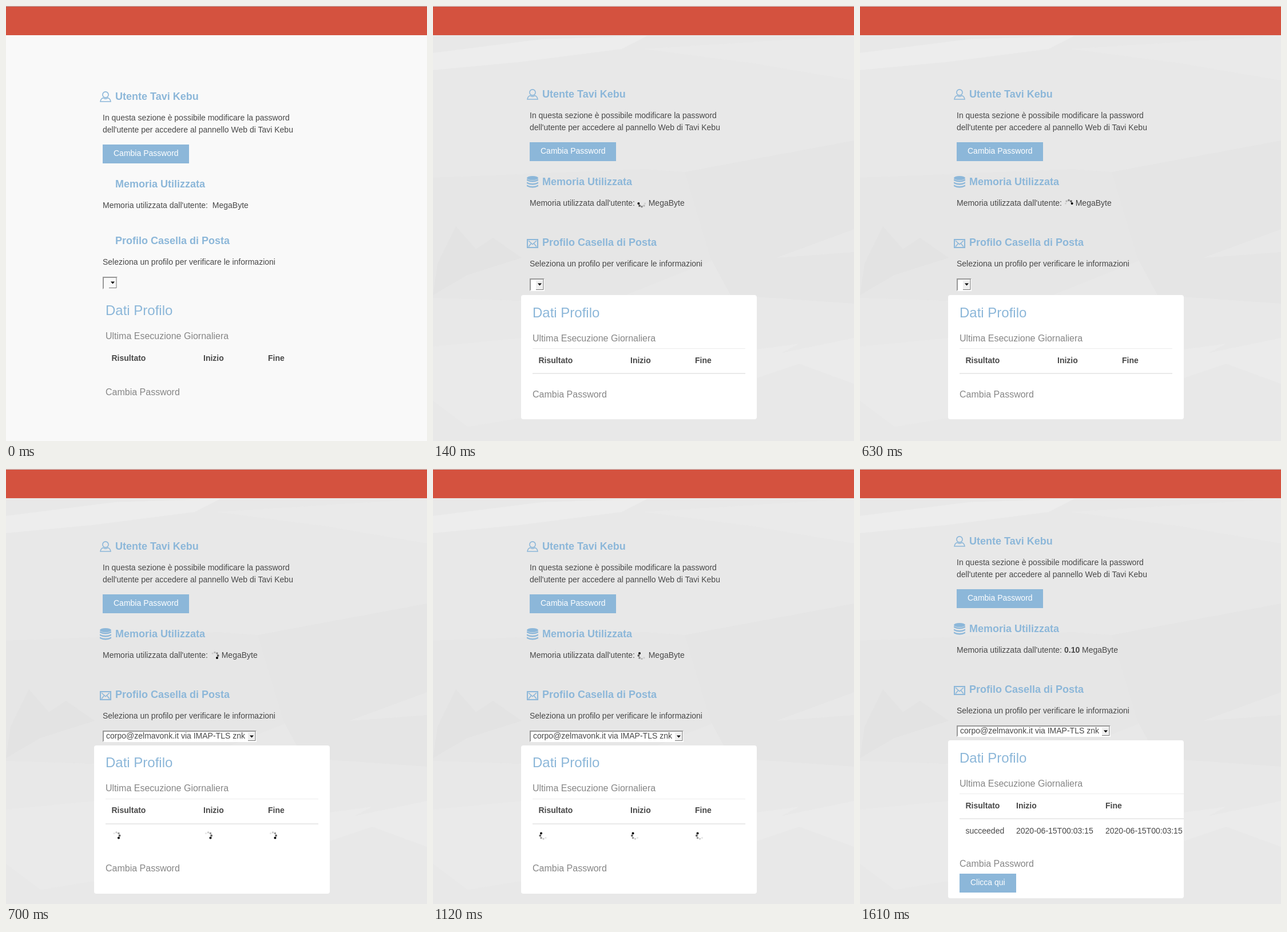
An HTML page for the animation above (1820 ms loop, 736x760 px).

```html
<!DOCTYPE html>
<html lang="it">
<head>
<meta charset="utf-8">
<style>
  html, body { margin: 0; width: 100%; height: 100%; overflow: hidden; background: #f9f9f9; }
  svg { display: block; font-family: "Liberation Sans", Arial, sans-serif; }
</style>
</head>
<body>
<svg id="stage" width="736" height="760" viewBox="0 0 736 760"></svg>
<script>
const LOOP = 1820, TICK = 70;
const BLUE = '#8cb7d9', TEXT = '#484848', GREY = '#868686';
const stage = document.getElementById('stage');

// Layout phases: vertical centres of each block
const phases = [
  { at: 0, top: 158, profile: 410, select: 473, title: 532, sub: 577, head: 615, change: 675 },
  { at: 140, top: 154, profile: 413, select: 476, panel: [505, 722], title: 536, sub: 581, lines: [598, 641], head: 619, change: 679 },
  { at: 700, top: 135, profile: 394, select: 457, panel: [483, 742], title: 513, sub: 558, lines: [576, 619], head: 596, row: 640, change: 698, filled: true },
  { at: 1190, top: 126, profile: 385, select: 448, panel: [474, 750], title: 505, sub: 550, lines: [567, 610], head: 588, row: 632, change: 690, filled: true, memory: true },
];

const rect = (x, y, w, h, fill, more = '') =>
  `<rect x="${x}" y="${y}" width="${w}" height="${h}" fill="${fill}" ${more}/>`;
const path = (d, fill, more = '') => `<path d="${d}" fill="${fill}" ${more}/>`;
const text = (x, mid, str, size = 14, fill = TEXT, weight = 400) =>
  `<text x="${x}" y="${mid + Math.round(size * .34)}" font-size="${size}" fill="${fill}" font-weight="${weight}" xml:space="preserve">${str}</text>`;
const heading = (mid, str) => text(191, mid, str, 18, BLUE, 700);
const button = (x, y, w, str) => rect(x, y, w, 33, BLUE) + text(x + 19, y + 15, str, 14, '#fff');
const at = (x, y, body) => `<g transform="translate(${x} ${y})">${body}</g>`;

const line = `stroke="${BLUE}" stroke-width="1.6"`;
const userIcon = `<circle cx="10" cy="6" r="5.1" fill="none" ${line}/>`
  + path('M6 11.5Q1.5 13 1 18H19Q18.5 13 14 11.5Q10 15 6 11.5', 'none', line);
const diskIcon = `<ellipse cx="10" cy="3.6" rx="10" ry="3.6" fill="${BLUE}"/>`
  + [5.5, 10.5, 15.5].map(y => path(`M0 ${y}Q10 ${y + 5} 20 ${y}V${y + 2.5}Q10 ${y + 7.5} 0 ${y + 2.5}Z`, BLUE)).join('');
const mailIcon = rect(1, 1, 18, 14, 'none', `stroke="${BLUE}" stroke-width="2"`)
  + path('M3 3L10 9.5L17 3M3 13.5L7.5 8M17 13.5L12.5 8', 'none', line);

const backdrop = rect(0, 51, 736, 709, '#e8e8e8')
  + path('M0 82L190 58L375 52L330 75L150 98L0 112Z', '#ededed')
  + path('M370 75L736 52V130L560 100Z', '#eaeaea')
  + path('M0 300L370 285L440 290L500 440L300 520L0 510Z', '#e6e6e6')
  + path('M8 450L40 385L75 425L105 405L155 440L60 470L0 505Z', '#e3e3e3')
  + path('M440 290L736 235V390L600 440L736 430V520L520 505L485 440Z', '#e5e5e5')
  + path('M0 595L154 580V720L60 735L0 690Z', '#eaeaea')
  + path('M566 600L640 590L610 606L736 580V660L640 625L566 650Z', '#ebebeb');

function spinner(x, y, step) {
  return [1, .62, .42, .22, .1].map((alpha, i) => {
    const a = (step - i) * Math.PI / 4;
    return `<circle cx="${x + 5.6 * Math.cos(a)}" cy="${y + 5.6 * Math.sin(a)}" r="${2 - i * .1}" opacity="${alpha}"/>`;
  }).join('');
}

function selectBox(y, filled, loaded) {
  const w = filled ? 269 : 26, h = filled ? 20 : 22, bx = 169 + w - 15;
  return rect(169, y, w, h, loaded ? '#fff' : '#f9f9f9')
    + path(`M169 ${y}h${w}l-2 2h${4 - w}v${h - 4}l-2 2Z`, '#989898')
    + rect(bx, y + 3, 13, h - 5, loaded ? '#efefef' : '#f9f9f9')
    + path(`M${bx} ${y + h - 2.5}h13v${4 - h}`, 'none', 'stroke="#777"')
    + path(`M${bx + 3} ${y + 8.5}h7l-3.5 4Z`, '#000')
    + (filled ? text(175, y + 9, 'corpo@zelmavonk.it via IMAP-TLS znk') : '');
}

function table(p, step, done) {
  const cols = done ? [184.5, 273, 429] : [184.5, 345, 458];
  const values = ['succeeded', '2020-06-15T00:03:15', '2020-06-15T00:03:15'];
  const rules = p.lines
    ? p.lines.map((y, i) => rect(174, y, done ? 392 : 372, 1 + i, i ? '#eaeaea' : '#ececec')).join('') : '';
  return rules + cols.map((x, i) =>
    text(x, p.head, ['Risultato', 'Inizio', 'Fine'][i], 14, TEXT, 700)
    + (!p.row ? '' : done ? text(x, p.row, values[i]) : spinner(x + 8.5, p.row + .5, step))).join('');
}

function render(time) {
  const p = phases.filter(s => s.at <= time).pop();
  const loaded = time >= 140, done = time >= 1610;
  const step = Math.floor((time + 265) / 100);
  const y = p.top, memory = y + 190;
  let out = loaded ? backdrop : rect(0, 51, 736, 709, '#f9f9f9');
  out += rect(0, 0, 736, 51, '#d4523f') + rect(0, 0, 736, 1, loaded ? '#c8d6da' : '#b8b0ae');

  out += at(164, y - 9, userIcon) + heading(y, 'Utente Tavi Kebu')
    + text(169, y + 37, 'In questa sezione è possibile modificare la password')
    + text(169, y + 58, "dell'utente per accedere al pannello Web di Tavi Kebu")
    + button(169, y + 84, 151, 'Cambia Password');

  out += heading(y + 153, 'Memoria Utilizzata') + text(169, memory, "Memoria utilizzata dall'utente:")
    + text(p.memory ? 388 : loaded ? 376.7 : 360.8, memory, 'MegaByte');
  if (p.memory) out += text(357, memory, '0.10', 14, TEXT, 700);
  else if (loaded) out += spinner(365, memory + 1, step);

  out += heading(p.profile, 'Profilo Casella di Posta')
    + text(169, p.profile + 37, 'Seleziona un profilo per verificare le informazioni')
    + selectBox(p.select, p.filled, loaded);
  if (loaded) out += at(164, y + 143, diskIcon) + at(164, p.profile - 6, mailIcon);

  if (p.panel) out += rect(154, p.panel[0], 412, p.panel[1] - p.panel[0], '#fff', 'rx="4"');
  out += text(174, p.title, 'Dati Profilo', 24, BLUE)
    + text(174, p.sub, 'Ultima Esecuzione Giornaliera', 16, GREY)
    + table(p, step, done)
    + text(174, p.change, 'Cambia Password', 16, GREY);
  if (p.memory) out += button(174, 707, 99, 'Clicca qui');
  stage.innerHTML = out;
}

let shown = -1;
function tick() {
  const time = Math.floor(performance.now() % LOOP / TICK) * TICK;
  if (time !== shown) render(shown = time);
  requestAnimationFrame(tick);
}
tick();
</script>
</body>
</html>
```
